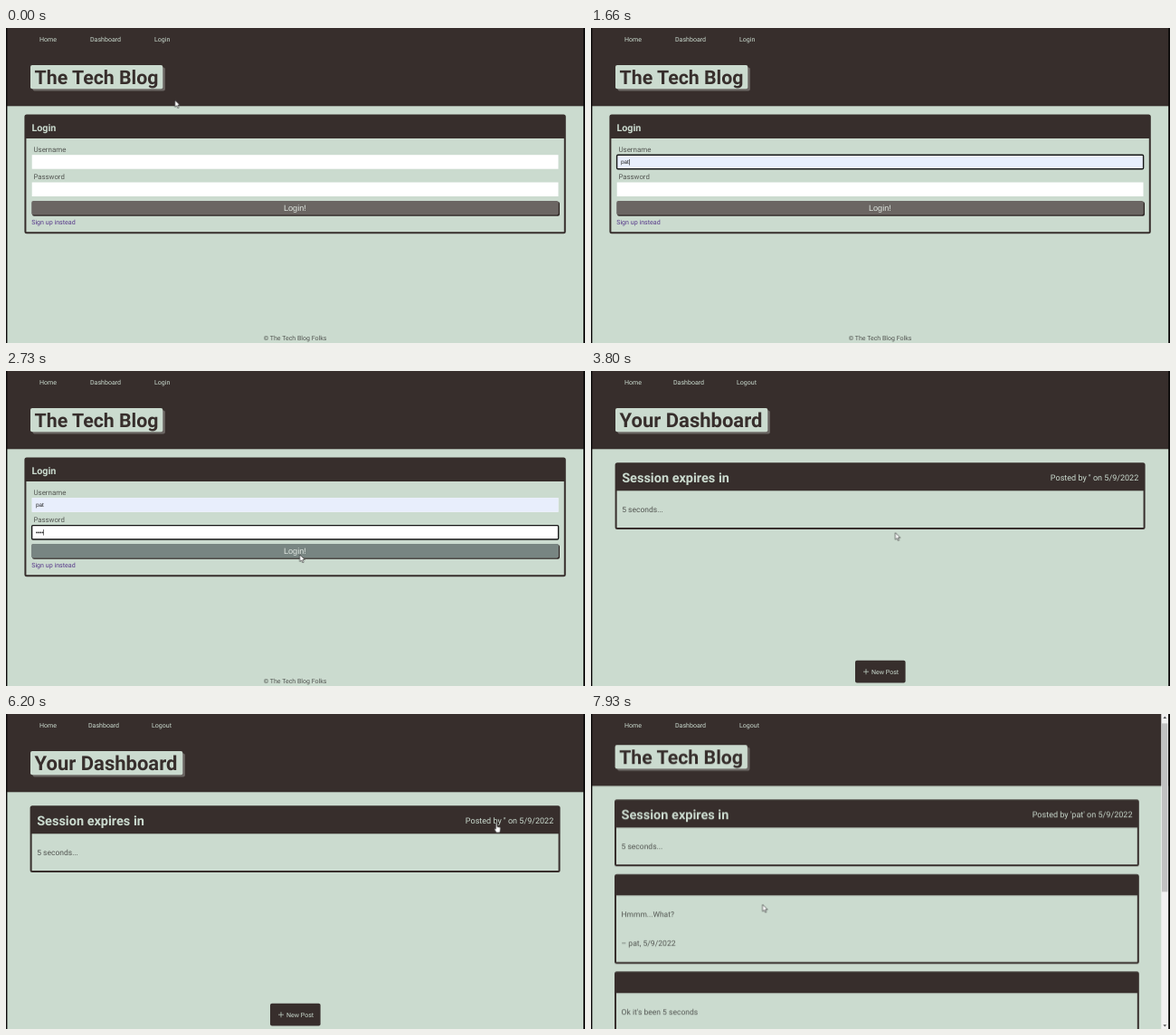
These frames come from a looping animation (640 px wide and 348 px high, 8000 ms). An HTML page:

```html
<!DOCTYPE html>
<html lang="en">
<head>
<meta charset="utf-8">
<title>Blog login</title>
<style>
  html, body { margin: 0; width: 100%; height: 100%; overflow: hidden; background: #cbdbcf; }
  svg { display: block; width: 100vw; height: 100vh; }
  text { font-family: Roboto, sans-serif; text-rendering: geometricPrecision; white-space: pre; }
  .field { font-family: "Liberation Sans", Arial, sans-serif; }
  .bold { font-weight: 700; }
  .end { text-anchor: end; }
  .mid { text-anchor: middle; }
</style>
</head>
<body>
<svg id="stage" viewBox="0 0 640 348" xmlns="http://www.w3.org/2000/svg"></svg>
<script>
const LOOP = 8000;
const DARK = '#372e2c', MINT = '#cbdbcf', GREY = '#6b6663', BODY = '#535652';
const USER = 'pat', DATE = '5/9/2022';

const rect = (x, y, w, h, fill, more = '') =>
  `<rect x="${x}" y="${y}" width="${w}" height="${h}" fill="${fill}" ${more}/>`;
const text = (x, y, str, size, fill, cls = '') =>
  `<text x="${x}" y="${y}" font-size="${size}" fill="${fill}" class="${cls}">${str}</text>`;
const group = (id, inner) => `<g id="${id}">${inner}</g>`;

const banner = (title, width, size, x = 27) =>
  rect(0, 0, 640, 86.3, DARK) +
  rect(x + 2.6, 43.6, width, 26, GREY, 'rx="2"') +
  rect(x, 41, width, 26.3, MINT, 'rx="2"') +
  text(x + 4.6, 62.2, title, size, DARK, 'bold');

const nav = (items) => items.map(([x, label]) => text(x, 15.2, label, 7.05, MINT)).join('');

const card = (x, y, w, h, head) =>
  rect(x + 1, y + 1, w - 2, h - 2, 'none', `rx="1.5" stroke="${DARK}" stroke-width="2"`) +
  rect(x + 1, y + 1, w - 2, head - 1, DARK);

const sessionCard = (x, y, right, user) =>
  card(x, y, right - x, 73.7, 31) +
  text(x + 7.6, y + 21.4, 'Session expires in', 14.5, MINT, 'bold') +
  text(right - 7.3, y + 19.9, `Posted by '${user}' on ${DATE}`, 9.05, MINT, 'end') +
  text(x + 7.6, y + 54.6, '5 seconds...', 8.5, BODY);

const footer = text(319.5, 345.4, '© The Tech Blog Folks', 7, BODY, 'mid');
const input = (y) => rect(28.7, y, 581.8, 15.5, '#fff');
const ring = (y) => rect(28.6, y, 582, 15.4, 'none', 'rx="1.2" stroke="#161616" stroke-width="1.4"');
const caret = (x, y) => rect(x, y, 0.6, 6.6, '#111');

const loginPage =
  banner('The Tech Blog', 146.3, 21.3) +
  nav([[37, 'Home'], [93, 'Dashboard'], [164, 'Login']]) +
  card(20.4, 95.4, 598.4, 131.8, 26.6) +
  text(28.4, 114, 'Login', 10.8, MINT, 'bold') +
  text(30.4, 136.6, 'Username', 7.95, BODY) + input(140.2) +
  group('filled', rect(28.7, 140.2, 581.8, 15.5, '#e8eefc')) +
  text(30.4, 166.6, 'Password', 7.8, BODY) + input(170.5) +
  group('nameRing', ring(140.3)) + group('passRing', ring(170.6)) +
  [...USER].map((_, i) => group('name' + i, text(33, 150.2, USER.slice(0, i + 1), 6.4, '#222', 'field'))).join('') +
  group('nameCaret0', caret(33, 145)) + group('nameCaret', caret(42.4, 145)) +
  [0, 1, 2, 3].map(i => group('dot' + i, `<circle cx="${34 + i * 2.15}" cy="178.4" r=".85" fill="#222"/>`)).join('') +
  group('passCaret', caret(41.3, 175)) +
  rect(29, 192, 583, 15.8, '#2b2221', 'rx="2"') +
  rect(28.2, 191, 582.6, 15.6, GREY, 'rx="2"') +
  group('hover', rect(28.2, 191, 582.6, 15.6, '#788582', 'rx="2"')) +
  text(319.4, 202.1, 'Login!', 9.2, '#dfe6e0', 'mid field') +
  text(28.2, 217, 'Sign up instead', 7.1, '#57388a') +
  footer;

const dashboard =
  banner('Your Dashboard', 168.3, 22) +
  nav([[37, 'Home'], [91, 'Dashboard'], [161, 'Logout']]) +
  sessionCard(26.6, 101.3, 612.6, '') +
  rect(292, 319.8, 55.6, 24.7, DARK, 'rx="2"') +
  `<path d="M301 332.2h6M304 329.2v6" stroke="${MINT}" stroke-width=".7"/>` +
  text(310, 334.9, 'New Post', 7.05, MINT);

const siteNav = nav([[37, 'Home'], [93, 'Dashboard'], [164, 'Logout']]);

const home = banner('The Tech Blog', 146.3, 21.3) + siteNav +
  sessionCard(26.6, 101.3, 612.6, USER) + footer;

const post =
  group('scroller',
    banner('The Tech Blog', 146.3, 21.3, 26.6) +
    sessionCard(26, 101.3, 605.8, USER) +
    card(26, 183.8, 579.8, 99, 23.4) +
    text(33.6, 230.5, 'Hmmm...What?', 8.45, BODY) +
    text(33.6, 263.2, `– ${USER}, ${DATE}`, 8.6, BODY) +
    card(26, 291.3, 579.8, 99, 23.8) +
    text(33.6, 338.7, "Ok it's been 5 seconds", 8.54, BODY)) +
  siteNav +
  rect(630.3, 0, 8, 348, '#f1f1f1') +
  group('thumb', rect(631, 7, 6.4, 186, '#c1c1c1')) +
  '<path d="M632.4 5l1.9-2.4 1.9 2.4zM632.4 343.2l1.9 2.4 1.9-2.4z" fill="#505050"/>';

const outline = 'fill="#fff" stroke="#222" stroke-width=".6" stroke-linejoin="round"';
const cursor =
  group('arrow', `<path d="M0 0v7.6l1.8-1.6 1.2 2.8 1.3-.6-1.2-2.7h2.5z" ${outline}/>`) +
  group('hand', `<path d="M-.4.3q.8-.7 1.5 0v3.9l3 .6q.9.3.8 1.2l-.4 3-.7 1.8H.2l-2.1-3.6q-.3-1.2.8-.9l.7.7z" ${outline}/>`) +
  group('beam', '<path d="M-1.4-4h2.8M0-4v8M-1.4 4h2.8" fill="none" stroke="#333" stroke-width=".7"/>');

const stage = document.getElementById('stage');
stage.innerHTML = rect(0, 0, 640, 348, MINT) +
  group('loginPage', loginPage) + group('dashboard', dashboard) +
  group('home', home) + group('post', post) +
  rect(0, 0, 1.4, 348, '#0b0909') + rect(638.2, 0, 1.8, 348, '#0b0909') +
  group('cursor', cursor);

const play = (id, frames) =>
  document.getElementById(id).animate(frames, { duration: LOOP, iterations: Infinity });

// Spans are [from, to] pairs in ms during which the part is visible.
function show(id, ...spans) {
  const key = (t, opacity) => ({ opacity, offset: t / LOOP, easing: 'step-end' });
  const frames = spans.flatMap(([from, to]) => [key(from, 1), key(to, 0)]);
  if (spans[0][0] > 0) frames.unshift(key(0, 0));
  if (spans.at(-1)[1] < LOOP) frames.push(key(LOOP, 0));
  play(id, frames);
}

// Stops are [ms, x, y].
const move = (id, stops, easing = 'linear') => play(id, stops.map(([t, x, y]) =>
  ({ offset: t / LOOP, transform: `translate(${x}px, ${y}px)`, easing })));

const DASH = 3600, HOME = 7090, POST = 7730;
show('loginPage', [0, DASH]);
show('dashboard', [DASH, HOME]);
show('home', [HOME, POST]);
show('post', [POST, LOOP]);

show('nameRing', [760, 2000]);
show('nameCaret0', [760, 1060]);
show('name0', [1060, 1200]);
show('name1', [1200, 1330]);
show('name2', [1330, DASH]);
show('filled', [1330, DASH]);
show('nameCaret', [1330, 1860]);
show('passRing', [2000, 3200]);
show('passCaret', [2400, 2930]);
[2130, 2200, 2330, 2400].forEach((t, i) => show('dot' + i, [t, DASH]));
show('hover', [2600, DASH]);

move('scroller', [[0, 0, 0], [7925, 0, -6.8], [LOOP, 0, -6.8]], 'step-end');
move('thumb', [[0, 0, 0], [7925, 0, 3.4], [LOOP, 0, 3.4]], 'step-end');

move('cursor', [
  [0, 186.7, 79.7], [60, 186.7, 79.7], [600, 165, 148], [1800, 165, 148],
  [1950, 172, 178], [2460, 172, 178], [2690, 324.7, 203], [3720, 324.7, 203],
  [4200, 393.6, 58.5], [4330, 393.6, 58.5], [4430, 399, 49], [4820, 42, 108],
  [5060, 96, 58.5], [5190, 96, 58.5], [5660, 421, 125.5], [6195, 421, 125.5],
  [6196, 541.8, 120.3], [6270, 541.8, 120.3], [6930, 44, 10], [7130, 44, 10],
  [7560, 128, 167.5], [7690, 128, 167.5], [7900, 189.6, 210.5], [LOOP, 189.6, 210.5]
]);
show('arrow', [0, 540], [2540, 4780], [4850, 5490], [6390, 6860], [HOME + 60, 7390], [POST, LOOP]);
show('beam', [540, 1060], [1800, 2130], [2460, 2540]);
show('hand', [4780, 4850], [5490, 6390], [6860, HOME + 60], [7390, POST]);
</script>
</body>
</html>
```
